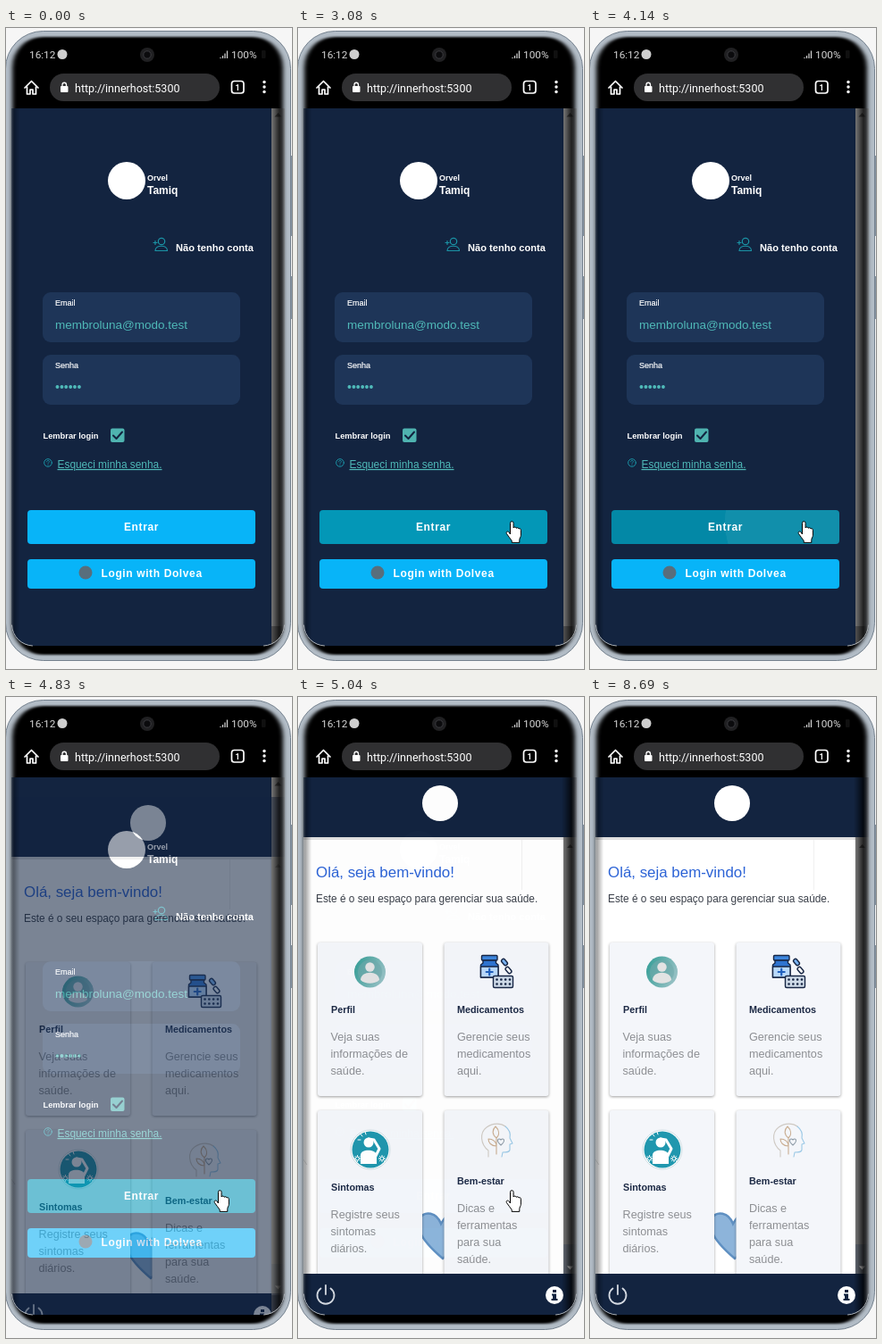
Animation of 320 by 718 pixels, one loop 8.82 s. Source, as an HTML page:

```html
<!DOCTYPE html>
<html lang="pt">
<head>
<meta charset="utf-8">
<title>Login</title>
<style>
html, body { margin: 0; height: 100%; overflow: hidden; background: #f6f6f6; }
svg.stage { display: block; width: 100vw; height: 100vh; }
text { font-family: "Liberation Sans", Arial, sans-serif; font-size: 12px; }
.ui { font-family: Roboto, sans-serif; font-size: 12.5px; fill: #fff; }
.status { fill: #d6d6d6; font-size: 11.8px; }
.label { font-size: 9px; fill: #fff; stroke: #fff; stroke-width: .2px; }
.value { font-size: 13.5px; fill: #4fb9b8; }
.strong { fill: #fff; font-weight: bold; font-size: 11.1px; }
.btn { font-weight: bold; fill: #fff; letter-spacing: .62px; }
.head { font-weight: bold; font-size: 10.8px; fill: #1d2a45; }
.body { font-size: 12.65px; fill: #8d8f93; }
.card { fill: #f4f6fa; filter: drop-shadow(0 1.5px 1.5px rgba(0,0,0,.38)); }
.line { fill: none; stroke-linecap: round; stroke-linejoin: round; }

.arrow, .hand, .click, .enter, .ripple, .home { animation: 8820ms step-end infinite; }
.arrow { animation-name: arrow; }
.hand { animation-name: hand; }
.click { animation-name: click; }
.enter { animation-name: enter; }
.home { animation-name: home; }
.ripple { animation-name: ripple; transform-origin: 239px 553px; }

@keyframes arrow {
  0%, 34.92%, 98.52%, 100% { transform: translate(400px, 546px); }
  28.45% { transform: translate(310px, 546px); }
  29.25% { transform: translate(294.7px, 555.6px); }
  30.04% { transform: translate(280.8px, 561.9px); }
  30.83% { transform: translate(268.2px, 564.5px); }
  31.63% { transform: translate(257px, 564px); }
  32.42% { transform: translate(247.4px, 560.4px); }
  33.21% { transform: translate(239px, 552.5px); }
  93.31% { transform: translate(308.5px, 704.5px); }
}
@keyframes hand {
  0%, 57.93%, 100% { opacity: 0; }
  34.92% { opacity: 1; }
}
@keyframes click {
  0%, 46.14%, 100% { opacity: 0; }
  44.67% { opacity: .9; }
}
@keyframes enter {
  0%, 100% { fill: #08b4f8; }
  30.83% { fill: #06a8da; }
  31.63% { fill: #049ec5; }
  32.42%, 53.96% { fill: #0397b7; }
  44.67% { fill: #0388a6; }
  47.7% { fill: #038da9; }
  50.8% { fill: #0392b1; }
}
@keyframes ripple {
  0%, 53.96%, 100% { opacity: 0; transform: scale(.2); }
  46.14% { opacity: .06; transform: scale(.2); animation-timing-function: steps(4); }
  49.3% { opacity: .06; transform: scale(1); animation-timing-function: steps(5); }
}
@keyframes home {
  0%, 100% { opacity: 0; transform: translateY(40px); }
  54.76% { opacity: .44; transform: translateY(22px); }
  55.55% { opacity: .89; transform: translateY(3.6px); }
  56.34% { opacity: .98; transform: translateY(.8px); }
  57.14% { opacity: .995; transform: none; }
  57.93% { opacity: 1; transform: none; }
}
</style>
</head>
<body>
<svg class="stage" viewBox="0 0 320 718" preserveAspectRatio="none">
  <defs>
    <clipPath id="page"><path d="M6 90H312V668a24 24 0 0 1-24 24H30a24 24 0 0 1-24-24z"/></clipPath>
    <clipPath id="button"><rect x="24" y="540" width="255" height="38" rx="4"/></clipPath>
    <clipPath id="list"><rect x="6" y="157" width="291" height="489"/></clipPath>
    <filter id="soft"><feGaussianBlur stdDeviation="2.5 1.2"/></filter>
    <linearGradient id="edge">
      <stop offset="0" stop-color="#6d7276" stop-opacity=".6"/><stop offset=".01" stop-color="#000" stop-opacity=".3"/>
      <stop offset=".03" stop-color="#000" stop-opacity="0"/><stop offset=".945" stop-color="#000" stop-opacity="0"/>
      <stop offset=".96" stop-color="#000" stop-opacity=".3"/><stop offset=".98" stop-color="#000" stop-opacity=".75"/>
      <stop offset=".99" stop-color="#2c2e30" stop-opacity=".9"/><stop offset="1" stop-color="#85898d" stop-opacity=".95"/>
    </linearGradient>
    <linearGradient id="teal" x2="1" y2=".4">
      <stop offset="0" stop-color="#2f9c94"/><stop offset="1" stop-color="#92bfc2"/>
    </linearGradient>
    <g id="germ" class="line" stroke="#fff" stroke-width=".9">
      <circle r="2"/><path d="M0-3.6V3.6M-3.6 0H3.6M-2.6-2.6L2.6 2.6M-2.6 2.6L2.6-2.6" stroke-dasharray="1.3 4.6"/>
    </g>
  </defs>

  <!-- phone -->
  <rect width="320" height="718" fill="#f6f6f6"/>
  <path d="M317 143h3v90h-3zM317 278h3v48h-3z" fill="#8593a1"/>
  <rect x="-.5" y="3.5" width="319" height="705" rx="42" fill="#b2bcc6" stroke="#74818e"/>
  <rect x="7" y="10" width="303" height="692" rx="34" filter="url(#soft)"/>

  <!-- status and address bars -->
  <text class="ui status" x="26" y="34">16:12</text>
  <circle cx="63" cy="29.5" r="5.5" fill="#cfcfcf"/>
  <circle cx="158" cy="30" r="8" fill="#202022"/>
  <circle cx="158" cy="30" r="4.2" fill="#0b0b0d" stroke="#3b3b40"/>
  <path d="M240 33v1M242.5 31v3M245 28.5v5.5M247.5 25.5v8.5" stroke="#ccc" stroke-width="1.3"/>
  <text class="ui status" x="252" y="34">100%</text>
  <rect x="286" y="25" width="4.5" height="9" rx="1" fill="#101010"/>
  <path class="line" d="M21 67l7.5-7.5L36 67M23.5 66v8h3.5v-5h3v5h3.500v-8" stroke="#fff" stroke-width="1.7"/>
  <rect x="49" y="51" width="190" height="31" rx="15.5" fill="#303032"/>
  <rect x="61" y="65" width="8.5" height="7" rx="1" fill="#fff"/>
  <path class="line" d="M63 65v-1.5a2.25 2.25 0 0 1 4.5 0V65" stroke="#fff" stroke-width="1.3"/>
  <text class="ui" x="77" y="71.5">http://innerhost:5300</text>
  <rect x="252.5" y="59.5" width="13.5" height="13.5" rx="3" fill="none" stroke="#fff" stroke-width="1.7"/>
  <text class="ui" x="259.2" y="69.5" text-anchor="middle" style="font-size:9px;font-weight:bold">1</text>
  <g fill="#fff"><circle cx="289" cy="60.5" r="1.7"/><circle cx="289" cy="66" r="1.7"/><circle cx="289" cy="71.5" r="1.7"/></g>

  <g clip-path="url(#page)">
    <!-- login -->
    <rect x="6" y="90" width="306" height="602" fill="#132440"/>
    <rect x="297" y="90" width="15" height="602" fill="#858585"/>
    <rect x="297" y="670" width="15" height="22" fill="#5c5c5c"/>
    <path d="M300.5 99.5l4-4.5 4 4.5z" fill="#444"/>
    <circle cx="135" cy="171" r="21" fill="#fff"/>
    <text x="158" y="171" fill="#fff" style="font-size:9px;font-weight:bold">Orvel</text>
    <text x="158" y="186" fill="#fff" style="font-size:12px;font-weight:bold">Tamiq</text>
    <g class="line" stroke="#1a93a5" stroke-width="1.2">
      <circle cx="174" cy="239" r="3.7"/><path d="M167 249.5c0-7 13.5-7 13.5 0zM165 240.5h4M167 238.5v4"/>
      <circle cx="47" cy="487" r="4.3" stroke-width="1"/>
      <path d="M45.6 485.8c0-2 2.9-1.8 2.8 0 0 1-1.4 1-1.4 2M47 489.5v.1" stroke-width=".9"/>
    </g>
    <text class="strong" x="190" y="250">Não tenho conta</text>
    <rect x="41" y="296" width="221" height="56" rx="9" fill="#1e3558"/>
    <rect x="41" y="366" width="221" height="56" rx="9" fill="#1e3558"/>
    <text class="label" x="55" y="311">Email</text>
    <text class="value" x="55" y="337">membroluna@modo.test</text>
    <text class="label" x="55" y="381">Senha</text>
    <text class="value" x="55" y="407" style="font-size:14px">••••••</text>
    <text class="strong" x="41.5" y="460" style="font-size:9.3px">Lembrar login</text>
    <rect x="117" y="448.5" width="15.5" height="15.5" rx="2" fill="#4fb3b0"/>
    <path class="line" d="M120 456.5l3.5 3.5 6.5-7.5" stroke="#132440" stroke-width="2"/>
    <text x="57.5" y="493" fill="#4fb9b8" text-decoration="underline" style="font-size:11.9px">Esqueci minha senha.</text>
    <rect class="enter" x="24" y="540" width="255" height="38" rx="4" fill="#08b4f8"/>
    <g clip-path="url(#button)"><circle class="ripple" cx="239" cy="553" r="220" fill="#fff"/></g>
    <text class="btn" x="132" y="563">Entrar</text>
    <rect x="24" y="595" width="255" height="33" rx="4" fill="#08b4f8"/>
    <circle cx="89" cy="610" r="7.5" fill="#586e7c"/>
    <text class="btn" x="106.5" y="615">Login with Dolvea</text>

    <!-- home -->
    <g class="home">
      <rect x="6" y="90" width="306" height="602" fill="#fff"/>
      <path d="M250.5 160v56" stroke="#f0f0f0"/>
      <rect x="297" y="157" width="15" height="489" fill="#858585"/>
      <rect x="297" y="613" width="15" height="33" fill="#6b727c"/>
      <path d="M301 169l3.5-4 3.5 4z" fill="#444"/>
      <path d="M301 637.5l3.5 4 3.5-4z" fill="#fff"/>
      <text x="20" y="202" fill="#2c63d6" style="font-size:16.9px">Olá, seja bem-vindo!</text>
      <text x="20" y="230" fill="#3b404a" style="font-size:11.85px">Este é o seu espaço para gerenciar sua saúde.</text>
      <g clip-path="url(#list)">
        <path d="M160 590c-5-13-18-15-24-6-6 12 6 28 26 45 18-14 34-30 30-46-8-12-24-8-32 7z" fill="#8db4da" stroke="#5f90c2" stroke-width="2.5"/>
        <path d="M6 518l4 6" stroke="#ddd"/>
        <rect class="card" x="22" y="275" width="117" height="172" rx="3"/>
        <rect class="card" x="163.5" y="275" width="117" height="172" rx="3"/>
        <rect class="card" x="22" y="463" width="117" height="210" rx="3"/>
        <rect class="card" x="163.5" y="463" width="117" height="210" rx="3"/>

        <circle cx="80.5" cy="308" r="17.5" fill="url(#teal)"/>
        <circle cx="80.5" cy="308" r="13.5" fill="#6fa9aa" opacity=".6"/>
        <circle cx="80.5" cy="302.5" r="5.2" fill="#e3e3e3"/>
        <path d="M70 317c0-11 21-11 21 0-5 5-16 5-21 0z" fill="#e3e3e3"/>

        <g class="line" stroke="#172644" stroke-width="1.4">
          <rect x="205.5" y="289.5" width="17.5" height="5.5" rx="1" fill="#3d86dc"/>
          <path d="M207 295h14.5v3l2.5 2v14h-19.5v-14l2.5-2z" fill="#2f74d0"/>
          <rect x="204.5" y="302" width="19.5" height="12" fill="#b9d9fa"/>
          <path d="M214.2 304.5v7M210.7 308h7" stroke="#2060bd" stroke-width="2.2"/>
          <rect x="218.5" y="312.5" width="22" height="13" rx="1.5" fill="#cfdbe8"/>
          <path d="M222.5 316.5h14.5M222.5 321.5h14.5" stroke-width="2.6" stroke-dasharray=".1 4.7"/>
          <rect x="-2.2" y="-4" width="4.4" height="8" rx="2.2" fill="#79b3f2" transform="translate(231 297) rotate(-40)"/>
          <rect x="-2.2" y="-4" width="4.4" height="8" rx="2.2" fill="#f5f5f5" transform="translate(235.5 306) rotate(-40)"/>
        </g>

        <circle cx="81" cy="507" r="22" fill="#fff" stroke="#cfdde2"/>
        <circle cx="81" cy="507" r="20.5" fill="#2097ae"/>
        <circle cx="79" cy="499" r="5.5" fill="#fff"/>
        <path d="M70 523v-10c0-7 17-7 18 0v10z" fill="#fff"/>
        <path class="line" d="M87 514l4-8-6-10-6-1" stroke="#fff" stroke-width="3"/>
        <use href="#germ" x="66.5" y="517"/><use href="#germ" x="94" y="517"/>
        <path class="line" d="M72 492l-2-2.5M76 490l-1-3M70 496h-3" stroke="#fff"/>

        <g class="line" stroke-width="1.1">
          <path d="M213 515v-7c-9-7-10-20-2-26 7-5 16-5 21-1" stroke="#cfcac4"/>
          <path d="M232 481c5 4 6 9 5 13l3 6-3 1v6c0 3-4 3-8 3l-1 5" stroke="#9cc9e6"/>
          <path d="M222 512v-18M222 503c-6 0-9-4-9-8 5 0 9 3 9 8zM222 494c-5-4-5-9-1-13 4 4 5 9 1 13z" stroke="#c9ad91"/>
          <path d="M227 502c-6-5-3-9 0-6 3-3 6 1 0 6z" stroke="#8d9aa6"/>
        </g>

        <text class="head" x="37" y="354">Perfil</text>
        <text class="head" x="178" y="354">Medicamentos</text>
        <text class="head" x="37" y="553">Sintomas</text>
        <text class="head" x="178" y="546">Bem-estar</text>
        <text class="body" y="385"><tspan x="36.5">Veja suas</tspan><tspan x="36.5" dy="19">informações de</tspan><tspan x="36.5" dy="19">saúde.</tspan></text>
        <text class="body" y="385"><tspan x="178">Gerencie seus</tspan><tspan x="178" dy="19">medicamentos</tspan><tspan x="178" dy="19">aqui.</tspan></text>
        <text class="body" y="584"><tspan x="36.5">Registre seus</tspan><tspan x="36.5" dy="19">sintomas</tspan><tspan x="36.5" dy="19">diários.</tspan></text>
        <text class="body" y="577"><tspan x="178">Dicas e</tspan><tspan x="178" dy="19">ferramentas</tspan><tspan x="178" dy="19">para sua</tspan><tspan x="178" dy="19">saúde.</tspan></text>
      </g>
      <rect x="6" y="157" width="291" height="3" opacity=".12"/>
      <rect x="6" y="90" width="306" height="67" fill="#132440"/>
      <circle cx="159" cy="119" r="20" fill="#fff"/>
      <rect x="6" y="646" width="306" height="46" fill="#132440"/>
      <path class="line" d="M25.5 662.5a9.5 9.5 0 1 0 11 0M31 659v10" stroke="#d5dae2" stroke-width="1.8"/>
      <circle cx="287" cy="670" r="10" fill="#fff"/>
      <path d="M285 664h4v3h-4zM284 668.5h5v5.5h1.5v2h-7v-2h1.5v-3.5h-1z" fill="#132440"/>
    </g>
    <rect x="6" y="90" width="306" height="602" fill="url(#edge)"/>
  </g>
  <path class="line" d="M6.5 669a24 24 0 0 0 23 23M311.5 669a24 24 0 0 1-23 23" stroke="#aeb3b8"/>

  <!-- pointer -->
  <circle class="click" cx="238" cy="552" r="12" fill="#83bd4b" opacity="0"/>
  <path class="hand" d="M237.5 567V554.5a1.8 1.8 0 0 1 3.6 0v5.5c.6-1.4 2.9-1.2 3.1.3.7-1 2.7-.7 2.8.7.8-.7 2.4-.2 2.4 1.2v6c0 2-1.6 3.2-1.6 5.2v3h-8.6v-2c-1.6-2.4-4.2-5.6-5.8-8-1-1.8 1-3.2 2.4-1.8z" fill="#fff" stroke="#000" stroke-linejoin="round"/>
  <path class="arrow" d="M.5.5V17l3.8-3.5 2.6 6 2.6-1.1-2.6-5.9H12z" fill="#fff" stroke="#000" stroke-width=".9"/>
</svg>
</body>
</html>
```
